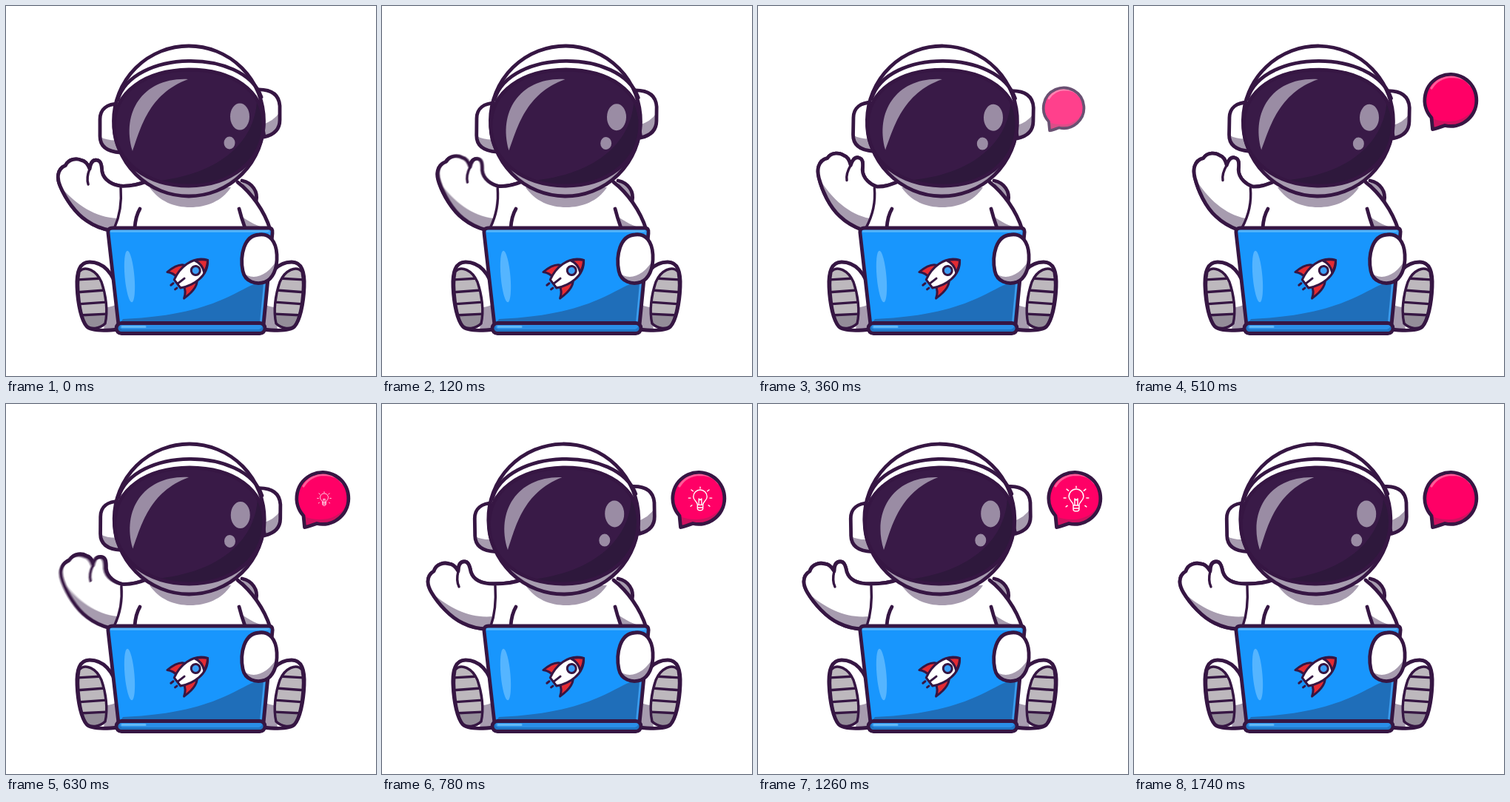
Animation, 500 px wide and 500 px high, one loop 1800 ms. Source, as an HTML page:

```html
<!DOCTYPE html>
<html lang="en">
<head>
<meta charset="utf-8">
<title>Waving astronaut</title>
<style>
html, body { margin: 0; width: 100%; height: 100%; overflow: hidden; background: #fff; }
svg { display: block; width: 100%; height: 100%; }
.line { fill: none; stroke: #361643; stroke-width: 4.8; stroke-linecap: round; stroke-linejoin: round; }
.white { fill: #fff; }
.shade { fill: #a79caf; }
.thin { stroke-width: 3.4; }
</style>
</head>
<body>
<svg viewBox="0 0 500 500">
  <defs>
    <path id="visorShape" d="M247 86C306 86 348 114 348 160C347 210 303 243 247 243C191 243 147 211 146 163C146 115 189 87 247 86Z"/>
    <path id="footShape" d="M151 386C145 360 131 346 113 346C99 346 95 360 96 380C97 404 102 425 109 433C115 440 135 439 153 437Z"/>
    <path id="soleShape" d="M99 359C107 350 122 357 129 373C135 390 138 412 134 429C126 437 114 437 109 432C100 420 95 380 99 359Z"/>
    <path id="lidShape" d="M144 300H355Q361 300 360 307L348 431H152L138 307Q137 300 144 300Z"/>
    <path id="handShape" d="M342 309C356 307 365 318 366 336C367 356 360 369 350 373C338 377 323 373 320 358C316 338 321 310 342 309Z"/>
    <path id="bubbleShape" d="M403.500 166.500L402 151A35 35 0 1 1 420 161.500C415 163 409 166 403.500 166.500Z"/>
    <path id="earL" d="M153 132C136 132 127 140 127 153V176C127 189 136 197 155 198Z"/>
    <path id="earR" d="M338 113C360 112 369 121 370 135V154C370 167 362 174 349 177Z"/>
    <clipPath id="visorClip"><use href="#visorShape"/></clipPath>
    <clipPath id="footClip"><use href="#footShape"/></clipPath>
    <clipPath id="soleClip"><use href="#soleShape"/></clipPath>
    <clipPath id="lidClip"><use href="#lidShape"/></clipPath>
    <clipPath id="handClip"><use href="#handShape"/></clipPath>
    <clipPath id="bubbleClip"><use href="#bubbleShape"/></clipPath>
    <clipPath id="earLClip"><use href="#earL"/></clipPath>
    <clipPath id="earRClip"><use href="#earR"/></clipPath>
    <clipPath id="headClip"><circle cx="247" cy="155.500" r="101.500"/></clipPath>

    <g id="foot">
      <use href="#footShape" class="white"/>
      <path class="shade" clip-path="url(#footClip)" d="M134 407Q146 407 155 399V442H132Z"/>
      <g clip-path="url(#soleClip)">
        <path fill="#bdb8bd" d="M90 345H140V440H90Z"/>
        <path fill="#948d99" d="M90 418H140V440H90Z"/>
        <path class="line thin" d="M94 370L130 368M94 387L134 384M95 403L138 400M98 418L138 416"/>
      </g>
      <use href="#soleShape" class="line thin"/>
      <use href="#footShape" class="line"/>
    </g>
  </defs>

  <!-- body -->
  <path class="shade" d="M318 236C333 240 341 251 338 264L326 256Z"/>
  <path class="line" d="M319 236C333 239 341 251 338 264"/>
  <path class="white" d="M187 238H313C333 252 351 276 357 306H160Z"/>
  <path class="line" d="M313 238C331 252 349 276 357 302"/>
  <g id="arm"></g>
  <path class="shade" d="M194 245H304C292 264 270 272 249 272C227 272 207 264 194 245Z"/>
  <path class="shade" d="M317 283L324 301H352C340 297 328 292 317 283Z"/>
  <path class="line" d="M181 274Q175 284 174 300M315 274Q318 286 323 300"/>

  <!-- head -->
  <g id="head">
    <use href="#earL" class="white"/>
    <path class="shade" clip-path="url(#earLClip)" d="M125 176Q138 183 155 181V202H125Z"/>
    <use href="#earL" class="line"/>
    <use href="#earR" class="white"/>
    <path class="shade" clip-path="url(#earRClip)" d="M346 160Q362 156 371 142V180H346Z"/>
    <use href="#earR" class="line"/>
    <circle class="white" cx="247" cy="155.500" r="102"/>
    <path class="shade" clip-path="url(#headClip)" d="M170 217Q247 270 326 215V262H170Z"/>
    <circle class="line" cx="247" cy="155.500" r="101.500"/>
    <path class="line" d="M151 127C171 58.500 321 56.500 345 123"/>
    <use href="#visorShape" fill="#391a47"/>
    <path clip-path="url(#visorClip)" fill="#2e183c" d="M337 100C350 166 306 227 198 237L245 250H355V110Z"/>
    <use href="#visorShape" class="line"/>
    <path fill="#9a8ca4" d="M246 99C187 96 155 142 171 196C182 166 192 119 246 99Z"/>
    <g fill="#9a8ca4">
      <ellipse cx="316" cy="149.500" rx="13" ry="18"/>
      <ellipse cx="302" cy="185" rx="7.500" ry="8.500"/>
    </g>
  </g>

  <!-- feet and laptop -->
  <use href="#foot"/>
  <use href="#foot" transform="translate(499) scale(-1 1)"/>
  <use href="#lidShape" fill="#1896fd"/>
  <g clip-path="url(#lidClip)">
    <path fill="#1f6eb9" d="M358 370C318 372 300 417 158 423L150 434H360Z"/>
    <path fill="none" stroke="#54b4fa" stroke-width="3.500" d="M141 304H356"/>
    <path fill="none" stroke="#3c9dee" stroke-width="2.500" d="M356 304L344 430"/>
  </g>
  <ellipse cx="167" cy="365.500" rx="6.500" ry="35" fill="#55b5ff" transform="rotate(-5 167 365.500)"/>
  <use href="#lidShape" class="line"/>
  <rect x="149" y="428.500" width="201" height="14" rx="7" fill="#1f75c4"/>
  <path fill="#2a8fe8" d="M155 430H344Q349 434 342 437H157Q151 435 155 430Z"/>
  <path fill="none" stroke="#62b9f8" stroke-width="3" stroke-linecap="round" d="M157 433.500H188"/>
  <rect class="line" x="149" y="428.500" width="201" height="14" rx="7"/>

  <!-- rocket -->
  <g transform="translate(245 365) rotate(52)" stroke="#361643" stroke-width="3" stroke-linejoin="round" stroke-linecap="round">
    <path fill="#e32b33" d="M-9 -9Q-22 -5 -21 18Q-15 12 -7 12ZM9 -9Q22 -4 21 22Q15 13 7 12Z"/>
    <path fill="#fff" d="M0 -35C18 -22 15 2 7 17H-7C-15 2 -18 -22 0 -35Z"/>
    <path fill="#e32b33" d="M0 -35Q7 -29 10 -21Q0 -26 -10 -21Q-7 -29 0 -35Z"/>
    <circle cx="1" cy="-13.500" r="6" fill="#3a9df5"/>
    <path fill="none" d="M0 5V16M-4 21V25M4 21V24"/>
  </g>

  <!-- hand on the laptop -->
  <use href="#handShape" class="white"/>
  <path class="shade" clip-path="url(#handClip)" d="M316 357C332 374 354 366 368 340V380H316Z"/>
  <use href="#handShape" class="line"/>

  <g id="bubble">
    <use href="#bubbleShape" fill="#ff0066"/>
    <path clip-path="url(#bubbleClip)" fill="#cf1260" d="M464 124C460 151 433 163 402 152V172H470V124Z"/>
    <path fill="none" stroke="#ff5c98" stroke-width="3.200" stroke-linecap="round" d="M402 111Q411 96 430 95.500Q447 95.500 455 107"/>
    <use href="#bubbleShape" class="line"/>
  </g>
  <g id="bulb" fill="none" stroke="#fff" stroke-width="1.500" stroke-linecap="round" stroke-linejoin="round">
    <path d="M426 137C426 132 420 131 420 125A10 10 0 0 1 440 125C440 131 434 132 434 137ZM426 137V142Q426 145 430 145Q434 145 434 142V137M426 141H434M428 136V128L430 130L432 128V136"/>
    <path d="M430 111V113M413 127H416M444 127H447M417 115L419.500 117M443 115L440.500 117M416 139L418 137.500M444 139L442 137.500"/>
  </g>
</svg>
<script>
const LOOP = 1800, STEP = 30, COPIES = 5, SHUTTER = 24;
const PIVOT = { x: 150, y: 295 };
const $ = id => document.getElementById(id);

const span = (t, from, to) => Math.min(1, Math.max(0, (t - from) / (to - from)));
const easeInOut = p => (1 - Math.cos(Math.PI * p)) / 2;
const easeOut = p => 1 - (1 - p) ** 3;

// Each point is x,y with an optional weight: how far it follows the swing.
const bend = (d, angle) => d.replace(/([\d.]+),([\d.]+)(?:,([\d.]+))?/g, (_, x, y, w = 1) => {
  const r = angle * w * Math.PI / 180, c = Math.cos(r), s = Math.sin(r);
  const dx = x - PIVOT.x, dy = y - PIVOT.y;
  return (PIVOT.x + dx * c - dy * s).toFixed(2) + " " + (PIVOT.y + dx * s + dy * c).toFixed(2);
});

const ARM = "M190,237,0 C178,242,0 166,243,0.3 151,243,0.6 C137,243 124,239 120,227" +
  " C118,217 116,213 111,213 C105,213 103,219 103,226" +
  " C99,219 94,216 90,216 C84,214 73,216 70,226 C65,229 62,234 62,240 C62,246 64,250 67,255" +
  " C76,270 92,288 109,296 C119,301 130,304 142,304,0.7";
const ARM_SHADE = "M67,255 C76,270 92,288 109,296 C119,301 130,304 148,304,0.6" +
  " L150,287,0.5 C120,290 92,277 67,255 Z";
const CUFF = "M153,246,0.3 C154,262,0.5 154,280,0.5 147,300,0.6";
const THUMB = "M103,226 C101,234 101,241 104,247";

function drawArm(angle, opacity) {
  const d = bend(ARM, angle);
  return `<g opacity="${opacity}"><path class="white" d="${d} L176 303 L190 262Z"/>` +
    `<path class="shade" d="${bend(ARM_SHADE, angle)}"/>` +
    `<path class="line" d="${d}"/>` +
    `<path class="line thin" d="${bend(CUFF, angle)} ${bend(THUMB, angle)}"/></g>`;
}

const swing = t => 8 + 9 * easeInOut(span(t, 0, 240)) - 17 * easeInOut(span(t, 530, 785));

const zoom = (el, s, x, y) =>
  el.setAttribute("transform", `translate(${x} ${y}) scale(${s}) translate(${-x} ${-y})`);

function draw(t) {
  // Averaged copies give the fast swing its motion blur.
  let arms = "";
  for (let i = 0; i < COPIES; i++) {
    const offset = SHUTTER * (i / (COPIES - 1) - 0.5);
    arms += drawArm(swing(t + offset), 1 / (i + 1));
  }
  $("arm").innerHTML = arms;
  $("head").setAttribute("transform", `rotate(${(swing(t) - 8) * 0.118} 247 258)`);

  const pop = easeInOut(span(t, 115, 470));
  zoom($("bubble"), pop, 360.5, 175);
  $("bubble").setAttribute("opacity", pop ** 1.2);

  const glow = easeOut(span(t, 530, 960)) * (1 - easeInOut(span(t, 1230, 1740)));
  zoom($("bulb"), glow, 430, 128);
  $("bulb").setAttribute("visibility", glow > 0.01 ? "visible" : "hidden");
}

const start = performance.now();
function tick() {
  const t = (performance.now() - start) % LOOP;
  draw(Math.floor(t / STEP) * STEP);
  requestAnimationFrame(tick);
}
tick();
</script>
</body>
</html>
```
